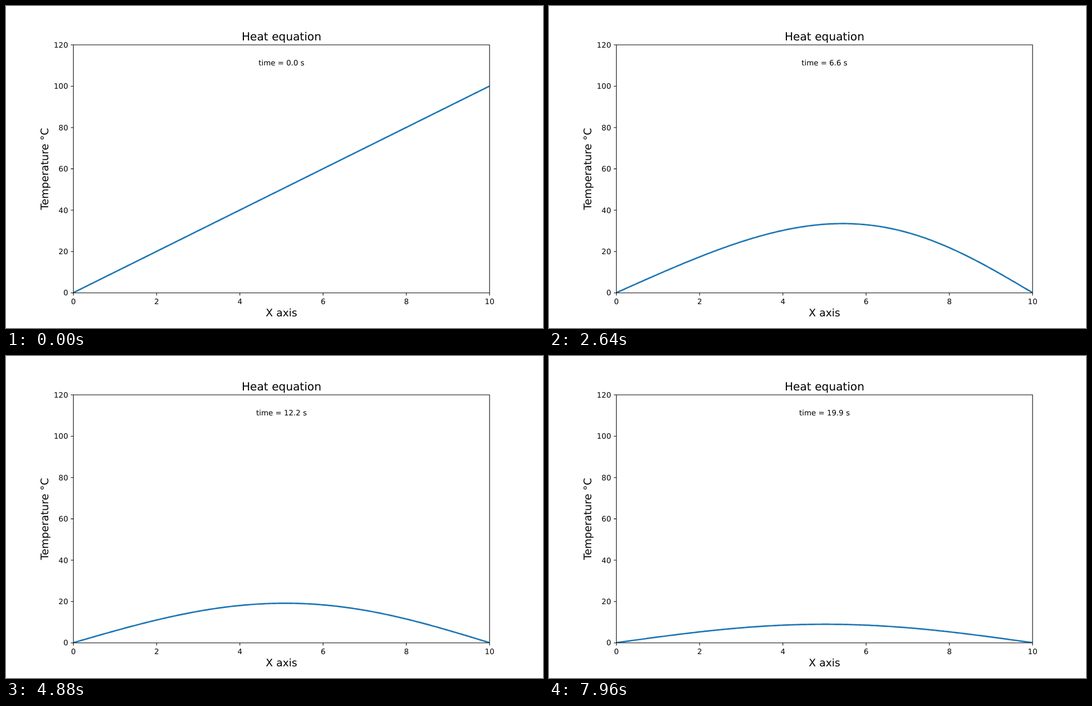
Write an HTML page that moves like this. It is 966 px wide and 580 px high and loops after 8000 ms.

```html
<!DOCTYPE html>
<html lang="en">
<head>
<meta charset="utf-8">
<title>Heat equation</title>
<style>
  html, body { margin: 0; width: 100%; height: 100%; overflow: hidden; background: #fff; }
  svg { display: block; }
  text {
    font: 13.89px "DejaVu Sans", sans-serif;
    text-anchor: middle;
    text-rendering: geometricPrecision;
  }
  .title { font-size: 20.9px; }
  .label { font-size: 19.44px; }
  .y { text-anchor: end; }
  #frame { fill: none; stroke: #000; stroke-width: 1.11; }
  #curve { fill: none; stroke: #1f77b4; stroke-width: 2.78; stroke-linejoin: round; stroke-linecap: square; }
</style>
</head>
<body>
<!-- A 1000 x 600 figure shown at stage size -->
<svg width="966" height="580" viewBox="0 0 1000 600" preserveAspectRatio="none">
  <clipPath id="plot"><rect x="125" y="72" width="775.5" height="462.5"/></clipPath>
  <path id="curve" clip-path="url(#plot)"/>
  <path id="frame"/>
  <g id="ticks"></g>
  <text class="title" x="513" y="64">Heat equation</text>
  <text class="label" x="513" y="578.2">X axis</text>
  <text class="label" transform="translate(78.7 303.5) rotate(-90)">Temperature °C</text>
  <text id="clock" x="513" y="110.5"></text>
</svg>
<script>
  const LENGTH = 10, FRAME_MS = 40, FRAMES = 200, MODES = 40, STEPS = 200;
  const byId = id => document.getElementById(id);
  const px = x => 125.4 + x * 77.5;
  const py = u => 534.25 - u * 3.85;
  const snap = v => Math.floor(v) + 0.5;

  function drawAxes() {
    let path = "M125.5 72.5H900.5V534.5H125.5Z", labels = "";
    for (let x = 0; x <= LENGTH; x += 2) {
      path += `M${snap(px(x))} 534.5v4.86`;
      labels += `<text x="${snap(px(x))}" y="555.3">${x}</text>`;
    }
    for (let u = 0; u <= 120; u += 20) {
      path += `M125.5 ${snap(py(u))}h-4.86`;
      labels += `<text class="y" x="115.6" y="${snap(py(u)) + 4.9}">${u}</text>`;
    }
    byId("frame").setAttribute("d", path);
    byId("ticks").innerHTML = labels;
  }

  // Fourier series for a linear start profile with both ends held at zero.
  function temperature(x, t) {
    if (t === 0) return 10 * x;
    let sum = 0;
    for (let n = 1; n <= MODES; n++) {
      const k = n * Math.PI / LENGTH;
      sum += (n % 2 ? 1 : -1) * 200 / (n * Math.PI) * Math.exp(-k * k * t) * Math.sin(k * x);
    }
    return sum;
  }

  let shown = -1;
  function draw(now) {
    const frame = Math.floor(now / FRAME_MS) % FRAMES;
    if (frame === shown) return;
    shown = frame;
    const t = frame / 10;
    const points = Array.from({ length: STEPS + 1 }, (_, i) => {
      const x = i * LENGTH / STEPS;
      return `${px(x).toFixed(2)} ${py(temperature(x, t)).toFixed(2)}`;
    });
    byId("curve").setAttribute("d", "M" + points.join("L"));
    byId("clock").textContent = `time = ${t.toFixed(1)} s`;
  }

  drawAxes();
  draw(0);
  let start;
  requestAnimationFrame(function loop(now) {
    start ??= now;
    draw(now - start);
    requestAnimationFrame(loop);
  });
</script>
</body>
</html>
```
